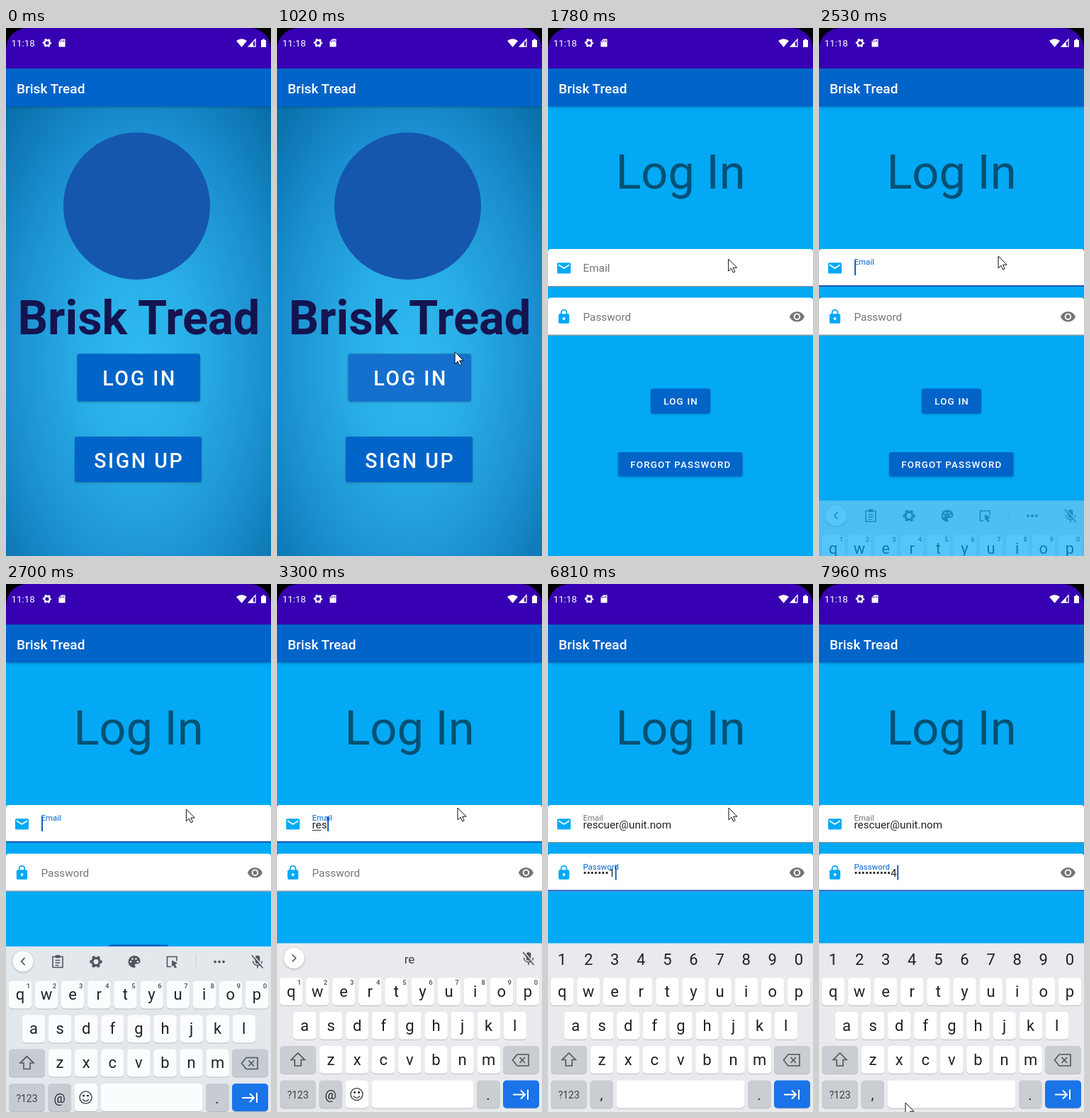
Animation, 374 px wide and 743 px high, one loop 8000 ms. Source, as an HTML page:

```html
<!DOCTYPE html>
<html lang="en">
<head>
<meta charset="utf-8">
<title>Log in</title>
<style>
html, body { margin: 0; width: 100%; height: 100%; overflow: hidden; background: #000; }
svg { display: block; width: 100vw; height: 100vh; font-family: Roboto, sans-serif; }
text { white-space: pre; }
.mid { text-anchor: middle; }
.btn { font-weight: 500; letter-spacing: .0893em; fill: #fff; text-anchor: middle; }
.lift { filter: drop-shadow(0 1.5px 1.5px rgba(0,0,0,.25)); }
.line { fill: none; stroke: #505459; stroke-width: 1.6; }
</style>
</head>
<body>
<svg id="stage" viewBox="0 0 374 743" preserveAspectRatio="none"></svg>
<script>
const LOOP = 8000;
const APP = 'Brisk Tread';
const EMAIL = 'rescuer@unit.nom';
const PASS = 'rescuer1234';
const EMAIL_TIMES = [2950, 3120, 3290, 3670, 3740, 3860, 3990, 4170,
                     4420, 4580, 4700, 4790, 4910, 5040, 5150, 5290];
const PASS_TIMES = [5850, 5980, 6130, 6230, 6330, 6510, 6590, 6810, 6990, 7120, 7340];
const OPEN = 1160, FOCUS = 2330, KEYS_IN = 2495, NEXT = 5450;
const EMAIL_Y = 311, PASS_Y = 379.5;
const POINTER = [[20, 328, 702], [600, 250, 494], [900, 250, 494], [1300, 255, 317],
  [1700, 255, 317], [2000, 253, 363], [2300, 253, 321], [2530, 253, 321],
  [2800, 255, 315], [7440, 255, 315], [7960, 122, 730]];

// ---- markup helpers ----
const rect = (x, y, w, h, fill, rx = 0, more = '') =>
  `<rect x="${x}" y="${y}" width="${w}" height="${h}" rx="${rx}" fill="${fill}" ${more}/>`;
const text = (x, y, size, str, fill, more = '') =>
  `<text x="${x}" y="${y}" font-size="${size}" fill="${fill}" ${more}>${str}</text>`;
const icon = (x, y, fill, d) =>
  `<path transform="translate(${x} ${y}) scale(.954)" fill="${fill}" fill-rule="evenodd" d="${d}"/>`;
const button = (x, y, w, h, size, base, str) =>
  rect(x, y, w, h, '#0064c8', 3, 'class="lift"') +
  text(x + w / 2 + size * .045, base, size, str, '#fff', 'class="btn"');
const gear = (x, y, r, fill) => `<g transform="translate(${x} ${y})" fill="none" stroke="${fill}">
  <circle r="${r * .6}" stroke-width="${r * .38}"/>
  <circle r="${r * .87}" stroke-width="${r * .26}" stroke-dasharray="${r * .455}" stroke-dashoffset="${r * .23}"/></g>`;

const header = rect(0, -70, 374, 127.5, '#3700b3') +
  rect(0, 57, 374, 53.5, '#0064c8', 0, 'class="lift"') +
  text(15, 91.5, 19.07, APP, '#fff', 'font-weight="500"');

const home = rect(0, 57, 374, 760, 'url(#glow)') + header +
  '<circle cx="184.5" cy="250.5" r="103.5" fill="#1557ae"/>' +
  text(187.5, 431, 66.8, APP, '#141450', 'class="mid" font-weight="700"') +
  button(100.5, 458.5, 173.5, 67, 28.6, 503, 'LOG IN') +
  button(97, 575, 179, 64, 28.6, 618.5, 'SIGN UP') +
  '<g clip-path="url(#pressClip)"><circle id="press" cx="252" cy="496" fill="#fff"/></g>';

const MAIL = 'M20 4H4C2.9 4 2 4.9 2 6V18C2 19.1 2.9 20 4 20H20C21.1 20 22 19.1 22 18V6C22 4.9 21.1 4 20 4ZM20 8L12 13L4 8V6L12 11L20 6Z';
const LOCK = 'M18 8H17V6A5 5 0 0 0 7 6V8H6A2 2 0 0 0 4 10V20A2 2 0 0 0 6 22H18A2 2 0 0 0 20 20V10A2 2 0 0 0 18 8ZM12 17A2 2 0 0 1 12 13A2 2 0 0 1 12 17ZM15.1 8H8.9V6A3.1 3.1 0 0 1 15.1 6Z';
const EYE = 'M12 4.5C7 4.5 2.7 7.6 1 12C2.7 16.4 7 19.5 12 19.5S21.3 16.4 23 12C21.3 7.6 17 4.5 12 4.5ZM12 17A5 5 0 0 1 12 7A5 5 0 0 1 12 17ZM12 9A3 3 0 0 0 12 15A3 3 0 0 0 12 9Z';

const field = (id, y, label) =>
  `<path d="M0 ${y + 53}V${y + 4}Q0 ${y} 4 ${y}H370Q374 ${y} 374 ${y + 4}V${y + 53}Z" fill="#fff"/>` +
  rect(0, y + 51, 374, 2, '#1f56b8', 0, `id="${id}Line"`) +
  text(49.5, 0, 15.3, label, '#757575', `id="${id}Label"`) +
  text(49.5, y + 32.5, 15.3, '', '#232323', `id="${id}Text"`) +
  rect(49.5, y + 16, 2, 21, '#1360c0', 0, `id="${id}Caret"`);

const login = rect(0, 57, 374, 686, '#03a9f5') + header + rect(0, 743, 374, 80, '#000') +
  text(187, 225.7, 66.8, 'Log In', '#045174', 'class="mid"') +
  field('email', EMAIL_Y, 'Email') + field('pass', PASS_Y, 'Password') +
  rect(49.5, 346, 0, 1, '#333', 0, 'id="under"') +
  icon(11, 326.5, '#03a9f5', MAIL) + icon(11, 394.7, '#03a9f5', LOCK) + icon(340, 394.7, '#757575', EYE) +
  button(145, 507.5, 84, 35, 13.36, 530, 'LOG IN') +
  button(99, 597, 175.5, 34, 13.36, 619, 'FORGOT PASSWORD');

// ---- keyboard ----
const INK = '#202124', GREY = '#cacdd2';
const key = (x, y, w, fill = '#fff') =>
  rect(x, y + 1, w, 39, '#000', 5, 'opacity=".2"') + rect(x, y, w, 39, fill, 5);
const row = (letters, x0, y) => [...letters].map((c, i) => {
  const x = x0 + i * 37.1;
  return key(x - 16.2, y, 32.5) + text(x, y + 26.5, 22, c, INK, 'class="mid"');
}).join('');
const digits = (x0, y, size, fill, weight) => [...'1234567890'].map((c, i) =>
  text(x0 + i * 37.1, y, size, c, fill, `class="mid" font-weight="${weight}"`)).join('');

const tools = `<g class="line">
  <path d="M66 520H80V535H66ZM69.500 525H76.500M69.500 528.500H76.500M69.500 532H74.500"/>
  <path d="M70.500 518.500H75.500V521H70.500Z" fill="#505459"/>
  <path d="M241 526V520H227.500V534H233"/>
  <path d="M234 525L242 529L238.500 531L241 535L238 536L236 532L234 534Z" fill="#505459" stroke="none"/>
  <path d="M268 516V537" stroke="#d0d3d7" stroke-width="1"/></g>` +
  gear(127, 527, 8.7, '#505459') +
  `<path fill="#505459" d="M181 518.500A8.500 8.500 0 0 0 181 535.500C183 535.500 183 533.500 182 532.500C181 531 182 530 183.500 530H186A4 4 0 0 0 189.500 526C189.500 522 186 518.500 181 518.500Z"/>` +
  [[176, 527], [178.5, 523], [183.5, 523], [186, 527]].map(([x, y]) =>
    `<circle cx="${x}" cy="${y}" r="1.4" fill="#e8eaed"/>`).join('') +
  [295, 301, 307].map(x => `<circle cx="${x}" cy="527" r="1.9" fill="#505459"/>`).join('');

const strip = '<circle cx="24" cy="526.5" r="14.5" fill="#fff" class="lift"/>' +
  '<path id="chevron" class="line" d="M2.5 -5L-2.5 0L2.5 5"/>' +
  `<g id="tools">${tools}</g>` +
  `<g id="words">${text(187, 533.5, 17, '', '#3c4043', 'class="mid" id="word"')}
   ${text(84, 533.5, 15, '', '#3c4043', 'class="mid" id="typed"')}</g>
  <g class="line"><rect x="352.500" y="519" width="5" height="10" rx="2.500" fill="#505459"/>
  <path d="M348.500 526C349 534 361 534 361.500 526M355 532V536"/>
  <path d="M348.500 517.500L363.500 534.500" stroke="#e8eaed"/><path d="M347 518L362.500 536"/></g>`;

const keyboard = rect(0, 505.5, 374, 238, '#e8eaed') +
  row('qwertyuiop', 20, 554) + row('asdfghjkl', 39, 602) + row('zxcvbnm', 76, 650) +
  key(4, 650, 51, GREY) + key(319, 650, 51, GREY) + key(4, 698.5, 51, GREY) +
  key(59.5, 698.5, 32.5, GREY) + key(282, 698.5, 32.5, GREY) + key(319, 698.5, 51, '#1a73e8') +
  '<path class="line" d="M29.500 660L20 669.500H25V678H34V669.500H39Z"/>' +
  '<path class="line" d="M339 662H355V678H339L332.500 670ZM342.500 666L350 674M350 666L342.500 674"/>' +
  '<path d="M333 718.500H350M344 712.500L350 718.500L344 724.500M354 711.500V725.500" fill="none" stroke="#fff" stroke-width="2"/>' +
  text(29.5, 724, 14, '?123', '#3c4043', 'class="mid"') + text(298, 726, 20, '.', INK, 'class="mid"') +
  `<g id="mailKeys">${key(96.5, 698.5, 32.5) + key(133.5, 698.5, 144) +
    text(75.5, 725, 18, '@', INK, 'class="mid"') + digits(31.5, 564, 9.5, '#5f6368', 700)}
    <g class="line"><circle cx="112.500" cy="718" r="8.500"/><path d="M108 720.500Q112.500 726 117 720.500"/></g>
    <circle cx="109.500" cy="715.500" r="1.400"/><circle cx="115.500" cy="715.500" r="1.400"/>${strip}</g>` +
  `<g id="passKeys">${key(96.5, 698.5, 181) + text(75.5, 725, 20, ',', INK, 'class="mid"') + digits(20, 535.5, 22, INK, 400)}</g>`;

const status = `<path d="M0 0H30A30 30 0 0 0 0 30ZM374 0H344A30 30 0 0 1 374 30Z" fill="#000"/>` +
  text(7.5, 26, 13.4, '11:18', '#fff') + gear(58, 21, 6.2, '#fff') +
  `<g fill="#fff"><path d="M78 15.500H83.500V26.500H74.500V19Z"/>
  <path d="M325 18Q332.500 12.500 340 18L332.500 27Z"/>
  <path d="M360 17H362V15.500H365V17H367V27H360Z"/></g>
  <path d="M342.500 26L352 16V26Z" fill="none" stroke="#fff" stroke-width="1.300"/><path d="M342 26.500L349 19V26.500Z" fill="#fff"/>
  <path d="M76.500 18V20M79 17V19.500M81.500 17V19.500" stroke="#3700b3"/>`;

const stage = document.getElementById('stage');
stage.innerHTML = `<defs>
  <radialGradient id="glow" gradientUnits="userSpaceOnUse" r="1"
    gradientTransform="translate(187 465) scale(275 495)" cx="0" cy="0">
    <stop offset="0" stop-color="#2fbaf0"/><stop offset=".3" stop-color="#29ade6"/>
    <stop offset=".65" stop-color="#1b8fd0"/><stop offset="1" stop-color="#066ca6"/>
  </radialGradient>
  <clipPath id="pressClip"><rect x="100.500" y="458.500" width="173.500" height="67" rx="3"/></clipPath></defs>
  <g id="home">${home}</g><g id="login">${login}</g><g id="keyboard">${keyboard}</g>${status}
  <path id="pointer" d="M0 0V17L4 13.200L6.600 19L9.200 17.800L6.600 12.200H12Z" fill="#fff" stroke="#111" stroke-width="1"/>`;

// ---- motion ----
const ui = {};
stage.querySelectorAll('[id]').forEach(e => ui[e.id] = e);
const set = (id, attrs) => { for (const k in attrs) ui[id].setAttribute(k, attrs[k]); };
const show = (id, on) => set(id, { display: on ? 'inline' : 'none' });
const write = (id, str) => { if (ui[id].textContent !== str) ui[id].textContent = str; };
const part = (t, start, span) => Math.min(1, Math.max(0, (t - start) / span));
const easeOut = (x, n) => 1 - (1 - x) ** n;
const smooth = x => x * x * (3 - 2 * x);
const count = (times, t) => times.filter(s => s <= t).length;
const zoom = s => `translate(187 371.5) scale(${s}) translate(-187 -371.5)`;

function drawField(id, y, t, start, focused, str) {
  const q = smooth(part(t, start, 150));
  set(id + 'Label', { y: y + 32.3 - 10 * q, 'font-size': 15.3 - 3.9 * q, fill: focused ? '#0064c8' : '#757575' });
  set(id + 'Line', { y: focused ? y + 51 : y + 52, height: focused ? 2 : 1.2, fill: focused ? '#1f56b8' : '#8a8f94' });
  write(id + 'Text', str);
  show(id + 'Caret', focused);
  if (focused) set(id + 'Caret', { x: 50 + (str ? ui[id + 'Text'].getComputedTextLength() : 0) });
}

function drawPointer(t) {
  let i = 0;
  while (i < POINTER.length - 2 && t > POINTER[i + 1][0]) i++;
  const [t0, x0, y0] = POINTER[i], [t1, x1, y1] = POINTER[i + 1];
  const p = smooth(part(t, t0, t1 - t0));
  show('pointer', t >= 21);
  set('pointer', { transform: `translate(${x0 + (x1 - x0) * p} ${y0 + (y1 - y0) * p})` });
}

function draw(t) {
  const open = easeOut(part(t, OPEN, 600), 5);
  show('home', open < 1);
  set('home', { transform: zoom(1 + .051 * open) });
  show('login', t >= OPEN);
  set('login', { transform: zoom(.85 + .15 * open), opacity: part(t, OPEN, 90) });

  const press = part(t, 610, 260);
  set('press', { r: 170 * press, opacity: .24 * (1 - part(t, 850, 250)) });

  const typed = count(EMAIL_TIMES, t), secret = count(PASS_TIMES, t);
  drawField('email', EMAIL_Y, t, FOCUS, t >= FOCUS && t < NEXT, EMAIL.slice(0, typed));
  drawField('pass', PASS_Y, t, NEXT, t >= NEXT, secret ? '•'.repeat(secret - 1) + PASS[secret - 1] : '');

  // the suggestions and the underline trail the typing slightly
  const known = count(EMAIL_TIMES, t - 140);
  const composing = known > 0 && typed < 8;
  set('under', { width: composing ? ui.emailText.getSubStringLength(0, known) : 0 });
  const words = known > 0 && t < 4420;
  show('words', words);
  show('tools', !words);
  write('word', known < 3 ? EMAIL.slice(0, known) : EMAIL.slice(0, 7));
  set('word', { x: known < 3 ? 187 : 200 });
  write('typed', known < 3 ? '' : EMAIL.slice(0, known));
  set('chevron', { transform: `translate(24 526.5) scale(${words ? -1 : 1} 1)` });

  const rise = easeOut(part(t, KEYS_IN, 280), 3);
  show('keyboard', rise > 0);
  set('keyboard', { transform: `translate(0 ${238 * (1 - rise)})`, opacity: rise });
  show('mailKeys', t < NEXT + 60);
  show('passKeys', t >= NEXT + 60);
  drawPointer(t);
}

let begin;
function tick(now) {
  begin ??= now;
  draw((now - begin) % LOOP);
  requestAnimationFrame(tick);
}
draw(0);
requestAnimationFrame(tick);
</script>
</body>
</html>
```
